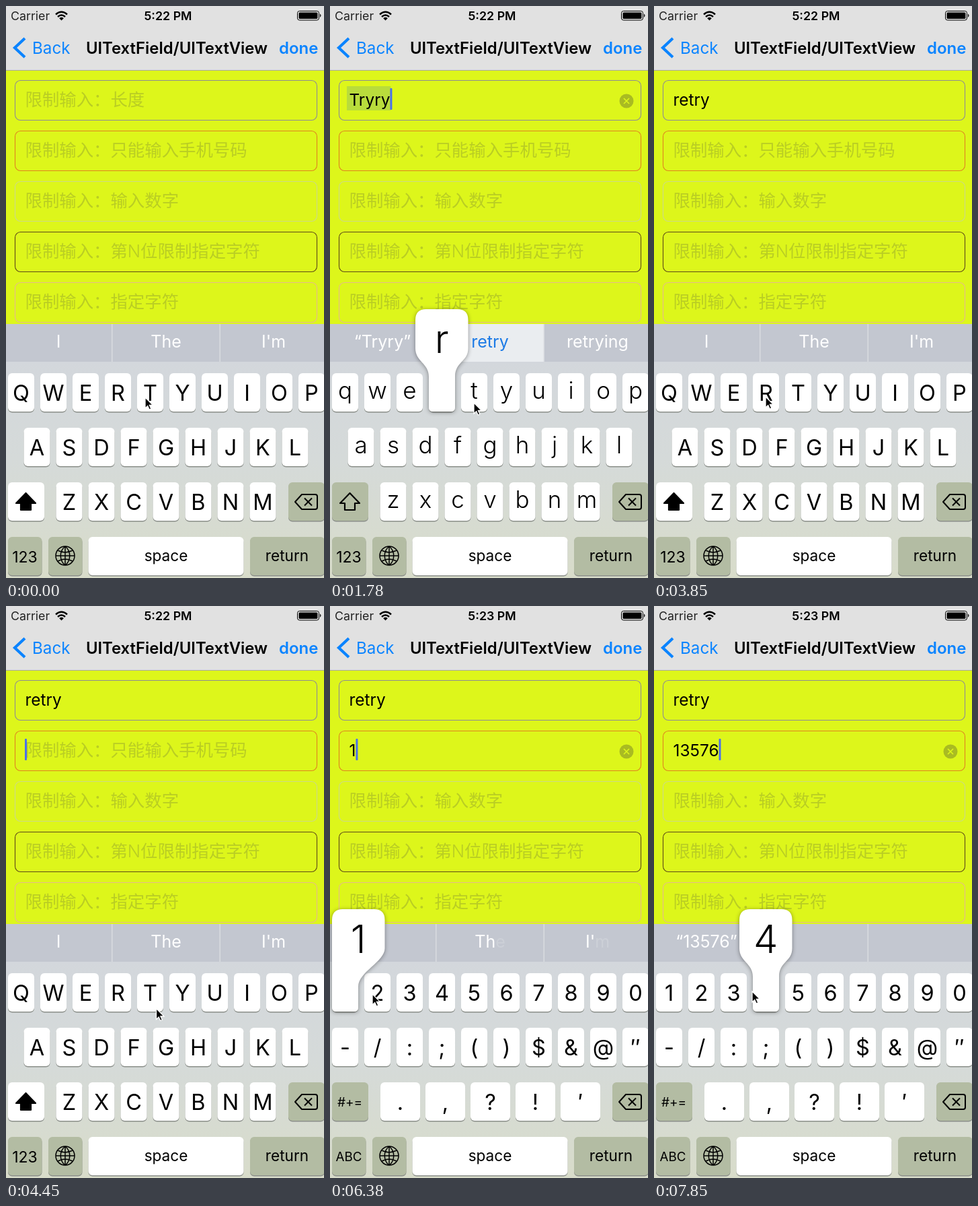
These frames come from a looping animation (473x849 px, 8000 ms). An HTML page:

```html
<!DOCTYPE html>
<html lang="en">
<head>
<meta charset="utf-8">
<title>Text field input limits</title>
<style>
  html, body { margin: 0; height: 100%; overflow: hidden; background: #ddf61b; }
  svg { display: block; width: 100vw; height: 100vh; }
  text { font-family: Inter, "Noto Sans CJK SC", "Noto Sans CJK", sans-serif; }
  .pop { filter: drop-shadow(0 1px 3px #0006); }
</style>
</head>
<body>
<svg id="stage" viewBox="0 0 473 849" preserveAspectRatio="none"></svg>
<script>
const LOOP = 8000, STEPS = 54, STEP = LOOP / STEPS;
const BLUE = '#0b84ff', YELLOW = '#ddf61b', SPECIAL = '#b3bca3';
const stage = document.getElementById('stage');
const ruler = document.createElement('canvas').getContext('2d');

// Timelines: [step, value], each value holds until the next entry.
const FIELD_1 = [[0, ''], [1, 'T'], [3, 'Tr'], [5, 'Try'], [7, 'Tryr'], [9, 'Tryry'], [22, 'retry']];
const FIELD_2 = [[0, ''], [43, '1'], [45, '13'], [47, '135'], [49, '1357'], [51, '13576']];
const MARKED = [[0, ''], [4, 'Tr'], [6, ''], [8, 'Tryr'], [10, 'Tryry'], [22, '']];
const POPUPS = [[0, ''], [1, 'T'], [2, ''], [3, 'r'], [4, ''], [5, 'y'], [6, ''], [7, 'r'], [8, ''],
  [9, 'y'], [10, ''], [12, 'r'], [13, ''], [14, 'y'], [15, ''], [16, 'r'], [17, ''], [18, 'y'], [19, ''],
  [27, 'R'], [28, ''], [29, 'Y'], [30, ''], [43, '1'], [44, ''], [45, '3'], [46, ''], [47, '5'], [48, ''],
  [49, '7'], [50, ''], [51, '6'], [52, ''], [53, '4']];
const DEFAULT_WORDS = ['I', 'The', "I'm"];
const WORDS = [[0, DEFAULT_WORDS], [2, ['“T”', 'The', 'This']], [4, ['“Tr”', 'To', 'trying']],
  [6, ['Try', 'Trying', 'trying']], [8, ['“Tryr”', 'Try', 'Tyre']], [10, ['“Tryry”', 'retry', 'retrying']],
  [22, DEFAULT_WORDS], [44, ['“1”', '', '']], [46, ['“13”', '', '']], [48, ['“135”', '', '']],
  [50, ['“1357”', '', '']], [52, ['“13576”', '', '']]];
const POINTER = [[0, 207, 581], [1, 207, 581], [3, 165, 585], [4, 255, 585], [5, 227, 582], [7, 166, 590],
  [9, 257, 592], [11, 166, 591], [12, 214, 589], [13, 257, 594], [15, 166, 594], [17, 257, 592],
  [19, 180, 560], [21, 120, 215], [22, 120, 215], [25, 166, 580], [27, 166, 580], [29, 257, 590],
  [31, 190, 605], [34, 89, 727], [36, 27, 812], [38, 27, 812], [40, 24, 625], [42, 22, 585], [43, 63, 576],
  [45, 115, 582], [47, 212, 580], [49, 308, 580], [51, 262, 584], [53, 146, 572]];

const at = (list, step) => list.findLast(entry => entry[0] <= step)[1];
const escapeText = s => s.replace(/&/g, '&amp;');
const rect = (x, y, w, h, fill, r = 0, extra = '') =>
  `<rect x="${x}" y="${y}" width="${w}" height="${h}" rx="${r}" fill="${fill}" ${extra}/>`;
const line = (d, width = 2, color = '#000', fill = 'none') =>
  `<path d="${d}" fill="${fill}" stroke="${color}" stroke-width="${width}" stroke-linejoin="round"/>`;
const label = (s, x, y, size, fill = '#000', anchor = 'middle', weight = 400) =>
  `<text x="${x}" y="${y}" font-size="${size}" fill="${fill}" text-anchor="${anchor}" font-weight="${weight}">${escapeText(s)}</text>`;

function textWidth(s) {
  ruler.font = '24.4px Inter, sans-serif';
  return ruler.measureText(s).width;
}

function pointerAt(step) {
  const i = Math.max(1, POINTER.findIndex(p => p[0] >= step));
  const [s0, x0, y0] = POINTER[i - 1], [s1, x1, y1] = POINTER[i];
  const u = (step - s0) / (s1 - s0);
  return [x0 + (x1 - x0) * u, y0 + (y1 - y0) * u];
}

function header(step) {
  return rect(0, 0, 473, 95, '#e1e1e1') + rect(0, 95, 473, 1, '#a9aa9b')
    + label('Carrier', 7, 21, 17.8, '#222', 'start')
    + label(step < 33 ? '5:22 PM' : '5:23 PM', 241, 21, 17.8, '#000', 'middle', 600)
    + line('M74 12.5Q82.500 5 91 12.500M77 16Q82.500 11 88 16', 2.4)
    + '<path d="M79.200 18.200Q82.500 15.500 85.800 18.200L82.500 21.500Z"/>'
    + rect(433.5, 7.5, 32, 13.500, 'none', 3, 'stroke="#000"') + rect(435.5, 9.5, 28, 9.5, '#000', 1.5)
    + '<path d="M467 11.500Q470 14 467 17Z"/>'
    + `<path d="M28 48L13 62L28 76" fill="none" stroke="${BLUE}" stroke-width="4.200"/>`
    + label('Back', 39, 71, 24.2, BLUE, 'start')
    + label('UITextField/UITextView', 254, 71, 23.9, '#000', 'middle', 600)
    + label('done', 464.5, 71, 24, BLUE, 'end', 600);
}

function fields(step) {
  const hints = ['长度', '只能输入手机号码', '输入数字', '第N位限制指定字符', '指定字符'];
  const borders = ['#8e8c94', '#e08420', '#cbd98a', '#5e4a18', '#e6b98c'];
  const texts = [at(FIELD_1, step), at(FIELD_2, step)];
  const active = step < 22 ? 0 : 1;
  const caretOn = active === 0 ? step > 0 : step >= 42 || (step + 1) % 7 < 4;
  const marked = at(MARKED, step);
  return hints.map((hint, i) => {
    const top = 110 + 75 * i, text = texts[i];
    let out = rect(13.5, top + .5, 449, 59, 'none', 8, `stroke="${borders[i]}" stroke-width="1.1"`);
    if (i === 0 && marked) out += rect(25, 119, textWidth(marked) + 4.5, 36, '#b9dc3c');
    out += text ? label(text, 28.5, top + 38, 24.4, '#000', 'start')
      : label('限制输入：' + hint, 28.5, top + 38, 25.4, '#b9cd24', 'start', 300);
    if (i !== active) return out;
    if (caretOn) out += rect(text ? 28.5 + textWidth(text) : 28, top + 12, 3, 32, '#4a70ee', 1);
    if (text) out += `<circle cx="441" cy="${top + 31}" r="10.500" fill="#a9bb22"/>`
      + line(`M437 ${top + 27}l8 8m0-8l-8 8`, 1.7, YELLOW);
    return out;
  }).join('');
}

function suggestions(step) {
  const words = at(WORDS, step), corrected = step >= 10 && step < 22;
  let out = rect(0, 472, 473, 56.500, '#c3c7d0');
  if (corrected) out += rect(158, 472, 161, 56.5, '#eaedf0');
  out += rect(157, 472, 1.5, 56, '#d9dce0') + rect(317.5, 472, 1.500, 56, '#d9dce0');
  words.forEach((word, i) => {
    const color = corrected && i === 1 ? '#1d7be6' : '#fff';
    const x = 78 + 160 * i;
    if (step === 43 && i)
      out += `<text x="${x}" y="507" font-size="25" fill="#fff" text-anchor="middle">${word.slice(0, 2)}<tspan opacity=".4" fill-opacity=".4">${word.slice(2)}</tspan></text>`;
    else out += label(word, x, 507, 25, color);
  });
  return out;
}

const key = (x, y, w, fill = '#fff') =>
  rect(x, y + 1.5, w, 57, '#8b8f8a', 6) + rect(x, y, w, 57, fill, 6);

function keyRow(chars, x, y, w = 39, pitch = 48) {
  return [...chars].map((c, i) => {
    const lower = /[a-z]/.test(c);
    return key(x + i * pitch, y, w)
      + label(c, x + i * pitch + w / 2, y + (lower ? 38 : 41), lower ? 35 : 32.5, '#000', 'middle', lower ? 300 : 400);
  }).join('');
}

function keyboard(step) {
  const numeric = step >= 37, upper = step < 2 || step >= 22;
  const cased = s => upper ? s.toUpperCase() : s;
  let out = '<linearGradient id="board" x2="0" y2="1"><stop stop-color="#d3d7dc"/><stop offset=".45" stop-color="#d5dad9"/><stop offset="1" stop-color="#d8dcca"/></linearGradient>'
    + rect(0, 528, 473, 321, 'url(#board)');
  if (numeric) {
    out += keyRow('1234567890', 3, 545) + keyRow('-/:;()$&@″', 3, 626) + keyRow('.,?!′', 75, 707, 59, 67)
      + key(3, 707, 54, SPECIAL) + label('#+=', 29.5, 743, 19);
  } else {
    out += keyRow(cased('qwertyuiop'), 3, 545) + keyRow(cased('asdfghjkl'), 26.500, 626)
      + keyRow(cased('zxcvbnm'), 74.5, 707) + key(3, 707, 54, upper ? '#fff' : SPECIAL)
      + line('M29.500 723L44 738H37V748H22V738H15Z', 2.2, '#000', upper ? '#000' : 'none');
  }
  return out + key(420, 707, 54, SPECIAL) + line('M430 736L440 725H460Q463 725 463 728V744Q463 747 460 747H440Z')
    + line('M444 730.500l11 11m0-11l-11 11')
    + key(3, 788, 50.500, SPECIAL) + (numeric ? label('ABC', 28, 824, 18.8) : label('123', 28, 826, 23))
    + key(63, 788, 50.5, SPECIAL)
    + line('M74 816a14 14 0 1 0 28 0a14 14 0 1 0-28 0H102M88 802V830M88 802C79 809 79 823 88 830C97 823 97 809 88 802M77 808Q88 814 99 808M77 824Q88 818 99 824', 1.5)
    + key(122.5, 788, 231, '#fff') + label('space', 238, 824, 22.6)
    + key(363, 788, 111, SPECIAL) + label('return', 418, 824, 22.6);
}

function popup(step) {
  const c = at(POPUPS, step);
  if (!c) return '';
  const digit = /\d/.test(c);
  const left = 3 + 48 * (digit ? '1234567890' : 'qwertyuiop').indexOf(c.toLowerCase()), right = left + 39;
  const edge = left === 3, l = edge ? left : left - 20, r = l + 78.5;
  const neck = edge ? 565 : 550;
  const leftSide = edge ? `V466` : `V550C${left} 530 ${l} 528 ${l} 508V466`;
  return `<path class="pop" fill="#fff" d="M${l + 16} 450H${r - 16}Q${r} 450 ${r} 466V508C${r} 528 ${right} ${neck - 22} ${right} ${neck}V596Q${right} 602 ${right - 6} 602H${left + 6}Q${left} 602 ${left} 596${leftSide}Q${l} 450 ${l + 16} 450Z"/>`
    + label(c, (l + r) / 2, 515, 58, '#000', 'middle', 300);
}

function pointer(step) {
  const [x, y] = pointerAt(step);
  return `<path transform="translate(${x} ${y})" d="M0 0V16L3.700 12.600L6.200 18L8.800 16.800L6.400 11.500H11.500Z" stroke="#fff" stroke-width="1.300"/>`;
}

let shown = -1;
function draw() {
  const t = performance.now() % LOOP;
  const step = Math.min(STEPS - 1, Math.floor((t + 5) / STEP));
  if (step !== shown) {
    shown = step;
    stage.innerHTML = rect(0, 0, 473, 849, YELLOW) + header(step) + fields(step)
      + suggestions(step) + keyboard(step) + popup(step) + pointer(step);
  }
  requestAnimationFrame(draw);
}
draw();
</script>
</body>
</html>
```
